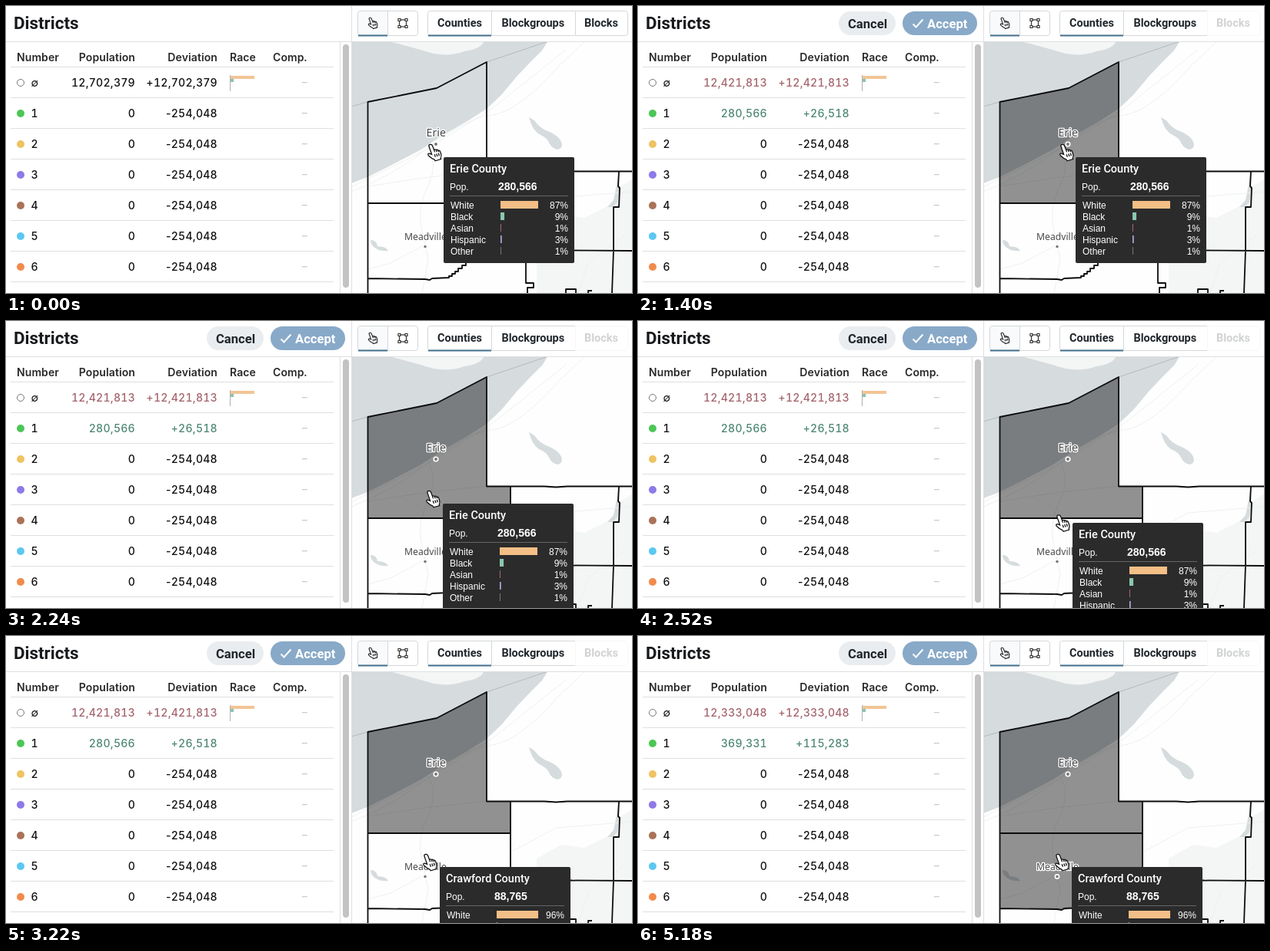
Recreate the animation shown at these times as an HTML page. Size 814x374 px, loop 5320 ms.

```html
<!DOCTYPE html>
<html lang="en">
<head>
<meta charset="utf-8">
<title>Districts</title>
<style>
  html, body { margin: 0; width: 100%; height: 100%; overflow: hidden; background: #fff; }
  svg { display: block; }
  .ui { font: 700 14.5px Roboto, sans-serif; fill: #20262b; }
  .title { font-size: 22.4px; fill: #17191c; }
  .button { font-size: 16.6px; }
  .table { font: 500 14px Inter, sans-serif; font-variant-numeric: tabular-nums; letter-spacing: .3px; fill: #111; }
  .sign { font-variant-numeric: normal; }
  .head { font-weight: 600; letter-spacing: .1px; fill: #282828; }
  .tip { font: 12px "Liberation Sans", Arial, sans-serif; fill: #fff; }
  .place { font-family: "Noto Sans", sans-serif; fill: #484848; stroke: #fff; stroke-width: 2.6; stroke-linejoin: round; paint-order: stroke; }
  .end { text-anchor: end; }
  .line { fill: none; stroke: #dcdfe1; }
  .water { fill: #d6dcde; }
  .road { fill: none; stroke: #eef0f0; }
  .border { fill: none; stroke: #0c0c0c; stroke-width: 1.8; stroke-linejoin: round; }
  .picked { fill: #000; fill-opacity: .43; }
</style>
</head>
<body>
<svg width="814" height="374" viewBox="0 0 814 374">
  <defs>
    <path id="hand" d="M2.5.5C4 0 5 .8 5.6 2.3L7.6 7.6c.8-1.2 2.3-1 2.8.2c.9-.9 2.3-.6 2.7.6c1-.6 2-.1 2.3.9l1.3 3.7c.6 2 .3 3.5-.4 5l.3 1.6-7.5 2.2-1-1.6C6 19.5 3 17.5.5 15C-1 13.5 0 11.7 2 12.3l2.6 1L1 3C.6 1.8 1 .8 2.5.5ZM7.6 7.6l1 2.8M10.4 7.8l.9 2.4M13.1 8.4l.7 1.8M8.2 13.2l1.2 3.6M10.8 12.5l1.2 3.6M13.3 11.8l1.1 3.5"/>
    <clipPath id="mapArea"><path d="M449.5 47H814V374H449.5Z"/></clipPath>
  </defs>

  <g clip-path="url(#mapArea)">
    <path fill="#fefefe" d="M449 46H814V374H449Z"/>
    <path fill="#f3f6f4" d="M690 290L722 272 752 276 788 258 797 236 814 226V374H690Z"/>
    <path class="water" d="M449 47H704L697 58 680 75 664 92 644 116 625 134 600 150 572 166 552 179 540 187 500 208 470 223 449 231Z"/>
    <path fill="#f4f5f5" d="M502 47H621Q617 56 596 59Q578 66 556 62Q528 54 502 47Z"/>
    <path class="water" d="M680 145q7 3 11 9q5 6 18 11q12 6 14 15q0 6-6 7q-8-2-11-9q-3-7-13-11q-9-6-13-22ZM474 305q8 0 9 8q11 0 14 6q-9 1-16-3q-7-4-7-11ZM796 219l2 20-3 17-7 6-6 0 8-9 3-15Z"/>
    <path class="road" d="M449 242Q502 222 550 184T632 142T720 77L752 47M449 236L545 188 633 133 728 57M550 184Q561 206 550 232Q533 263 541 293L549 330 541 374M471 235L542 224 625 215M656 282L715 250 814 242M541 313L500 335 471 343M744 374L757 334 804 299"/>
    <path class="road" style="stroke:#b4b9bb" d="M449 131L470 125M625 73L702 47"/>
    <path id="erie" class="picked" d="M470.5 125L560 107 625 73V215.5H656V257H470.5Z"/>
    <path id="crawford" class="picked" d="M470.5 257H656V354H576L551 357 545 356 470.5 355Z"/>
    <path class="border" d="M470.5 374V125L560 107 625 73V215.5H700L715 216.5 730 215.5H814M470.5 257H656M656 215.5V334M470.5 355L545 356 551 357 554 355 576 354V352H580V349H584V346H588V342H593V338H598V334H676V361H686V367H678V374M656 318L814 319M797 215.5L796 235 798 237 797 262H790V318L788 374M728 374V369H741V374M757 374V371H762"/>
    <g fill="#777" stroke="#fff" stroke-width="1.6"><circle cx="559" cy="180" r="2.8"/><circle cx="545" cy="313.5" r="2.6"/></g>
    <text class="place" x="546.5" y="170" font-size="14.2">Erie</text>
    <text class="place" x="518" y="304.5" font-size="12.2">Meadville</text>
  </g>

  <path fill="#fff" d="M449 0H814V46H449Z"/>
  <path class="line" d="M0 46.5H814M449.5 0V374M434.5 47V374"/>
  <rect x="438" y="50" width="8" height="317" rx="4" fill="#c3c3c3"/>

  <path fill="#f8fafb" d="M458 7H496V39H458Z"/>
  <g class="line" style="stroke:#d3d8dc">
    <rect x="457.5" y="6.5" width="78" height="32" rx="3"/>
    <path d="M496.5 7V38M631.5 7V38M740 6.5H551.5Q548.5 6.5 548.5 9.5V35.5Q548.5 38.5 551.5 38.5H740"/>
  </g>
  <path stroke="#426f8b" stroke-width="2" d="M458 38.5H496M549 38.5H631"/>
  <use href="#hand" transform="translate(471.5 15) scale(.67)" fill="none" stroke="#222" stroke-width="1.6"/>
  <g fill="#fff" stroke="#333" stroke-width="1.2">
    <rect x="511.5" y="18" width="9" height="9"/>
    <path d="M510 16.5h3v3h-3ZM519 16.5h3v3h-3ZM510 25.5h3v3h-3ZM519 25.5h3v3h-3Z"/>
  </g>
  <g class="ui">
    <text x="561" y="27">Counties</text>
    <text x="644.5" y="27">Blockgroups</text>
    <g id="blocks">
      <path class="line" style="stroke:#d3d8dc" d="M740.5 6.5H805.5Q808.5 6.5 808.5 9.5V35.5Q808.5 38.5 805.5 38.5H740.5Z"/>
      <text x="752" y="27">Blocks</text>
    </g>
    <text class="title" x="10" y="30">Districts</text>
    <g id="actions" class="button">
      <rect x="261" y="7" width="74" height="31" rx="15.5" fill="#eaedf0"/>
      <text x="273" y="28.5">Cancel</text>
      <rect x="344" y="7" width="97" height="31" rx="15.5" fill="#88a9c8"/>
      <path d="M357.5 23.5L361.5 27.5 370.5 17.5" fill="none" stroke="#fff" stroke-width="2"/>
      <text x="376" y="28.5" fill="#fff">Accept</text>
    </g>
  </g>

  <g class="table">
    <g class="head">
      <text x="14" y="72">Number</text>
      <text class="end" x="168" y="72">Population</text>
      <text class="end" x="275" y="72">Deviation</text>
      <text x="291" y="72">Race</text>
      <text x="347" y="72">Comp.</text>
    </g>
    <g id="rows"></g>
  </g>
  <path fill="#f2c595" d="M291 91H323V95H291Z"/>
  <path fill="#8cc2ae" d="M291 95H296V99H291Z"/>
  <path stroke="#b0b0b0" d="M291.5 90V111"/>

  <g id="tip" class="tip">
    <rect width="170" height="138" rx="2" fill="#2b2b2b"/>
    <text id="county" x="8" y="20" style="font:500 14.5px Roboto,sans-serif"></text>
    <text x="8" y="42.5">Pop.</text>
    <text id="people" x="71" y="43" font-weight="700" font-size="14"></text>
    <path stroke="#666" d="M8 50.5H162"/>
    <g id="groups"></g>
  </g>
  <use id="cursor" href="#hand" fill="#fff" stroke="#111" stroke-width="1.3"/>
</svg>

<script>
const LOOP = 5320, STEP = 70;
const FIRST_PICK = 1330, COUNTY_SWAP = 3080, SECOND_PICK = 4340;
const TOTAL = 12702379, IDEAL = 254048;
const COUNTIES = [
  { name: 'Erie County', people: 280566, shares: [87, 9, 1, 3, 1] },
  { name: 'Crawford County', people: 88765, shares: [96, 2, 0, 1, 1] }
];
const GROUPS = ['White', 'Black', 'Asian', 'Hispanic', 'Other'];
const BAR_COLORS = ['#f3bf87', '#8bc7ae', '#dd8596', '#b3a5e0', '#999'];
const DOT_COLORS = ['#4cc656', '#efc362', '#8e79e8', '#a97358', '#5cc8f2', '#f18b4c'];
// time, tooltip x and y, cursor x and y
const PATH = [
  [1890, 569, 197, 549, 180],
  [2240, 568, 238, 547, 221],
  [2520, 565, 263, 544, 252.5],
  [2870, 565, 286, 543.5, 272],
  [3150, 564, 301, 543, 284]
];

const $ = id => document.getElementById(id);
const grouped = n => n.toLocaleString('en-US');
const signed = n => `<tspan class="sign">${n > 0 ? '+' : '-'}</tspan>${grouped(Math.abs(n))}`;

function place(t) {
  const i = PATH.findIndex(p => p[0] > t);
  if (i <= 0) return PATH[i < 0 ? PATH.length - 1 : 0].slice(1);
  const a = PATH[i - 1], b = PATH[i], k = (t - a[0]) / (b[0] - a[0]);
  return a.slice(1).map((v, j) => v + (b[j + 1] - v) * k);
}

function tableRow(i, people, deviation, color) {
  const y = 100 + 40 * i;
  const dot = i ? `fill="${DOT_COLORS[i - 1]}" r="5"` : 'fill="#fff" stroke="#777" r="4.5"';
  return `<path class="line" d="M6 ${y - 20.5}H426"/><circle cx="19" cy="${y}" ${dot}/>
    <text x="32.5" y="${y + 5}" font-weight="${i ? 500 : 400}">${i || '∅'}</text>
    <g class="end" fill="${color}">
      <text x="168" y="${y + 5}">${grouped(people)}</text>
      <text x="275" y="${y + 5}">${signed(deviation)}</text>
    </g>
    <text class="end" x="392" y="${y + 4}" fill="#ccc">–</text>`;
}

function drawTable(assigned) {
  const rest = TOTAL - assigned;
  let html = tableRow(0, rest, rest, assigned ? '#a4646d' : '#111');
  for (let i = 1; i < 7; i++) {
    const people = i === 1 ? assigned : 0;
    html += tableRow(i, people, people - IDEAL, people ? '#4f8874' : '#111');
  }
  $('rows').innerHTML = html + '<path class="line" d="M6 359.5H426"/>';
}

function drawCounty({ name, people, shares }) {
  $('county').textContent = name;
  $('people').textContent = grouped(people);
  $('groups').innerHTML = GROUPS.map((group, i) => {
    const y = 66.5 + 15 * i;
    return `<text x="9" y="${y}">${group}</text>
      <rect x="74" y="${y - 9.5}" width="${Math.max(.7, shares[i] * .563)}" height="10" fill="${BAR_COLORS[i]}"/>
      <text class="end" x="162" y="${y + .5}">${shares[i]}%</text>`;
  }).join('');
}

let lastState = '';
function draw(now) {
  const t = Math.floor(now % LOOP / STEP) * STEP;
  const picks = (t >= FIRST_PICK) + (t >= SECOND_PICK);
  const hovered = +(t >= COUNTY_SWAP);
  const state = `${picks},${hovered}`;
  if (state !== lastState) {
    lastState = state;
    drawTable(COUNTIES.slice(0, picks).reduce((sum, c) => sum + c.people, 0));
    drawCounty(COUNTIES[hovered]);
    $('erie').style.display = $('actions').style.display = picks ? '' : 'none';
    $('crawford').style.display = picks > 1 ? '' : 'none';
    $('blocks').style.opacity = picks ? .2 : 1;
  }
  const [tipX, tipY, handX, handY] = place(t);
  $('tip').setAttribute('transform', `translate(${tipX} ${tipY})`);
  $('cursor').setAttribute('transform', `translate(${handX} ${handY})`);
}

const start = performance.now();
function tick() {
  draw(performance.now() - start);
  requestAnimationFrame(tick);
}
tick();
</script>
</body>
</html>
```
